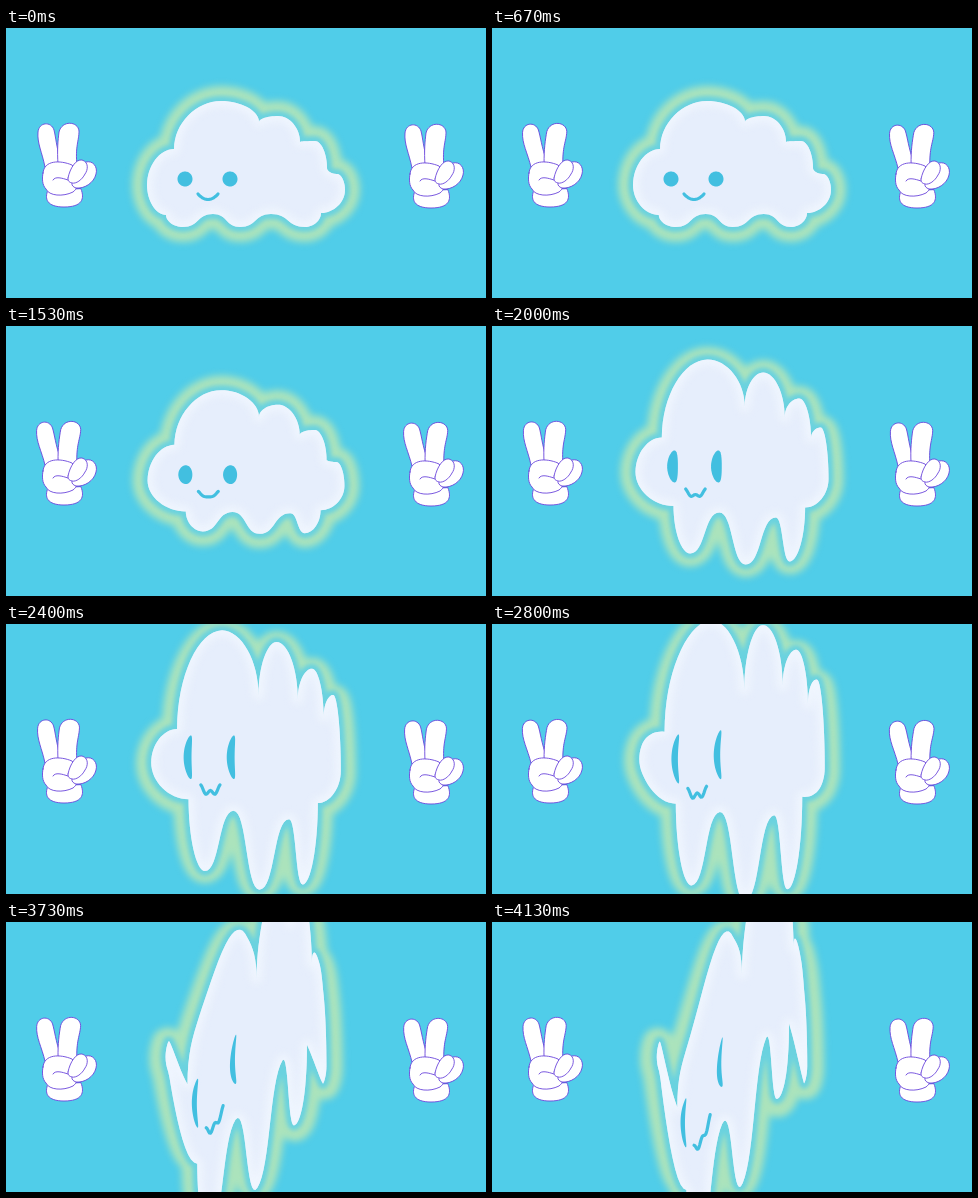
Animation of 480 by 270 pixels, one loop 4.19 s. Source, as an HTML page with a canvas:

```html
<!DOCTYPE html>
<html lang="en">
<head>
<meta charset="utf-8">
<title>Stretching cloud</title>
<style>
html, body { margin: 0; width: 100%; height: 100%; overflow: hidden; background: #50cde9; }
canvas { display: block; width: 100vw; height: 100vh; }
</style>
</head>
<body>
<canvas id="stage" width="480" height="270"></canvas>
<script>
const ctx = document.getElementById('stage').getContext('2d');
const LOOP = 4190, STEP = 200 / 3, SKY = '#50cde9', INK = '#42bfe0';

// Tips and valleys, clockwise from the left: x, y, full vertical stretch,
// and whether the curve enters and leaves horizontally or vertically.
const KEYS = [
  [141, 157, -22, 'vv'], [168, 121, -19, 'hv'], [215, 73, -79, 'hh'],
  [253, 94, -27, 'vv'], [272, 88, -83, 'hh'], [294, 114, -46, 'vv'],
  [309, 113, -81, 'hh'], [321, 140, -56, 'vv'], [331, 146, -89, 'hh'],
  [339, 162, -18, 'vv'], [315, 185, -7, 'hv'], [299, 199, 73, 'hh'],
  [265, 186, 11, 'hh'], [234, 199, 79, 'hh'], [207, 186, 1, 'hh'],
  [177, 199, 57, 'hh'], [160, 187, -14, 'vh']
];
const FIRST_DRIFTING = 12;

const clamp = v => Math.max(0, Math.min(1, v));
function ease(time, from, to) {
  const u = clamp((time - from) / (to - from));
  return u * u * (3 - 2 * u);
}

function motion(time) {
  return {
    stretch: ease(time, 1200, 2800),
    drift: 20 * ease(time, 0, 1700),
    lean: clamp((time - 2700) / 1430)
  };
}

// Squeezes towards the middle while the left half sinks and the right half rises.
function warp([x, y], { stretch, lean }) {
  const off = x - 240;
  const d = Math.min(1, Math.abs(off) / 95);
  const wave = Math.sin(Math.PI * d ** 1.5);
  return [
    x - off * (0.05 * stretch + 0.19 * lean),
    y - Math.sign(off) * 95 * lean * wave
  ];
}

function polyline(points, m, closed) {
  const path = new Path2D();
  points.forEach(p => path.lineTo(...warp(p, m)));
  if (closed) path.closePath();
  return path;
}

function cloudPath(m) {
  const pts = KEYS.map(([x, y, lift], i) =>
    [x + (i >= FIRST_DRIFTING ? m.drift : 0), y + lift * m.stretch]);
  const handle = (p, q, dir) => dir === 'h'
    ? [p[0] + (q[0] - p[0]) * 0.53, p[1]]
    : [p[0], p[1] + (q[1] - p[1]) * 0.53];
  const out = [];
  pts.forEach((p, i) => {
    const j = (i + 1) % pts.length, q = pts[j];
    const a = handle(p, q, KEYS[i][3][1]), b = handle(q, p, KEYS[j][3][0]);
    for (let u = 0; u < 1; u += 1 / 16) {
      const v = 1 - u;
      out.push([0, 1].map(k => v * v * v * p[k] + 3 * v * v * u * a[k]
        + 3 * v * u * u * b[k] + u * u * u * q[k]));
    }
  });
  return polyline(out, m, true);
}

function eyePath(cx, m) {
  const { stretch, lean } = m, points = [];
  const rx = 7.5 - 4 * stretch - lean, ry = 7.5 + 17 * stretch;
  for (let a = 0; a < Math.PI * 2; a += 0.1) {
    const s = Math.sin(a);
    points.push([cx + rx * Math.cos(a) + 4 * stretch * s * s, 151 - 21 * stretch + ry * s]);
  }
  return polyline(points, m, true);
}

function mouthPath(m) {
  const points = [];
  for (let u = -1; u <= 1.01; u += 0.1) {
    const fold = 6 * m.stretch * Math.cos(Math.PI * u) ** 2;
    points.push([202 + 10 * u + m.stretch, 171.5 - 5.5 * u * u - fold]);
  }
  return polyline(points, m, false);
}

function line(path, color, width, blur) {
  ctx.filter = blur ? `blur(${blur}px)` : 'none';
  ctx.strokeStyle = color;
  ctx.lineWidth = width;
  ctx.stroke(path);
  ctx.filter = 'none';
}

function drawCloud(time) {
  const m = motion(time);
  const shape = cloudPath(m);

  // The glow stretches a little less than the body.
  const halo = cloudPath({ ...m, stretch: m.stretch * 0.94, lean: m.lean * 0.92 });
  line(halo, '#abe3bc', 30, 3.5);
  line(shape, '#6ad2df', 10, 2.2);

  ctx.fillStyle = '#e6eefc';
  ctx.filter = 'blur(0.6px)';
  ctx.fill(shape);
  ctx.filter = 'none';
  ctx.save();
  ctx.clip(shape);
  line(shape, '#f0f6fe', 10, 4);
  ctx.restore();

  const face = { ...m, lean: m.lean * 0.75 };
  ctx.fillStyle = INK;
  ctx.fill(eyePath(179, face));
  ctx.fill(eyePath(224, face));
  line(mouthPath(face), INK, 3.2);
}

const hand = {
  left: new Path2D('M39 139C36 124 31 115 32 104C33 94 45 93 48 102C50 110 50 117 55 135'),
  right: new Path2D('M52 136C51 122 52 112 53 104C56 92 72 93 73 103C73 113 69 118 71 138'),
  wrist: new Path2D('M42 162C38 171 41 179 58 179C76 179 79 171 75 161Z'),
  palm: new Path2D('M37 145C38 132 54 132 66 137C73 145 75 158 67 164C57 169 43 168 40 161C36 157 36 150 37 145Z'),
  outer: new Path2D('M80 134C87 132 92 139 90 146C88 155 78 161 70 160C64 158 65 153 70 152Z'),
  inner: new Path2D('M62 150C64 140 70 131 76 132C83 134 82 142 79 146C76 152 70 156 66 155C62 154 62 152 62 150'),
  thumb: new Path2D('M47 152C49 148 56 150 62 152')
};

function part(path, angle = 0, x = 0, y = 0) {
  ctx.save();
  ctx.translate(x, y);
  ctx.rotate(angle);
  ctx.translate(-x, -y);
  ctx.fillStyle = '#fff';
  ctx.fill(path);
  line(path, '#6b47dc', 0.9);
  ctx.restore();
}

function drawHand(x, y, spread) {
  ctx.save();
  ctx.translate(x, y);
  part(hand.wrist);
  part(hand.left, -0.05 * spread, 46, 137);
  part(hand.right, 0.06 * spread, 62, 137);
  part(hand.palm);
  part(hand.outer);
  part(hand.inner);
  part(hand.thumb);
  ctx.restore();
}

ctx.lineJoin = ctx.lineCap = 'round';
const start = performance.now();

function draw(now) {
  const t = Math.max(0, now - start) % LOOP;
  const step = Math.min(62, Math.floor((t + 5) / STEP));
  ctx.fillStyle = SKY;
  ctx.fillRect(0, 0, 480, 270);
  drawCloud(step * STEP);
  const spread = (1 - Math.cos(step * Math.PI * 6 / 50)) / 2;
  drawHand(0, 0, spread);
  drawHand(367, 1, spread);
  requestAnimationFrame(draw);
}
draw(start);
</script>
</body>
</html>
```
